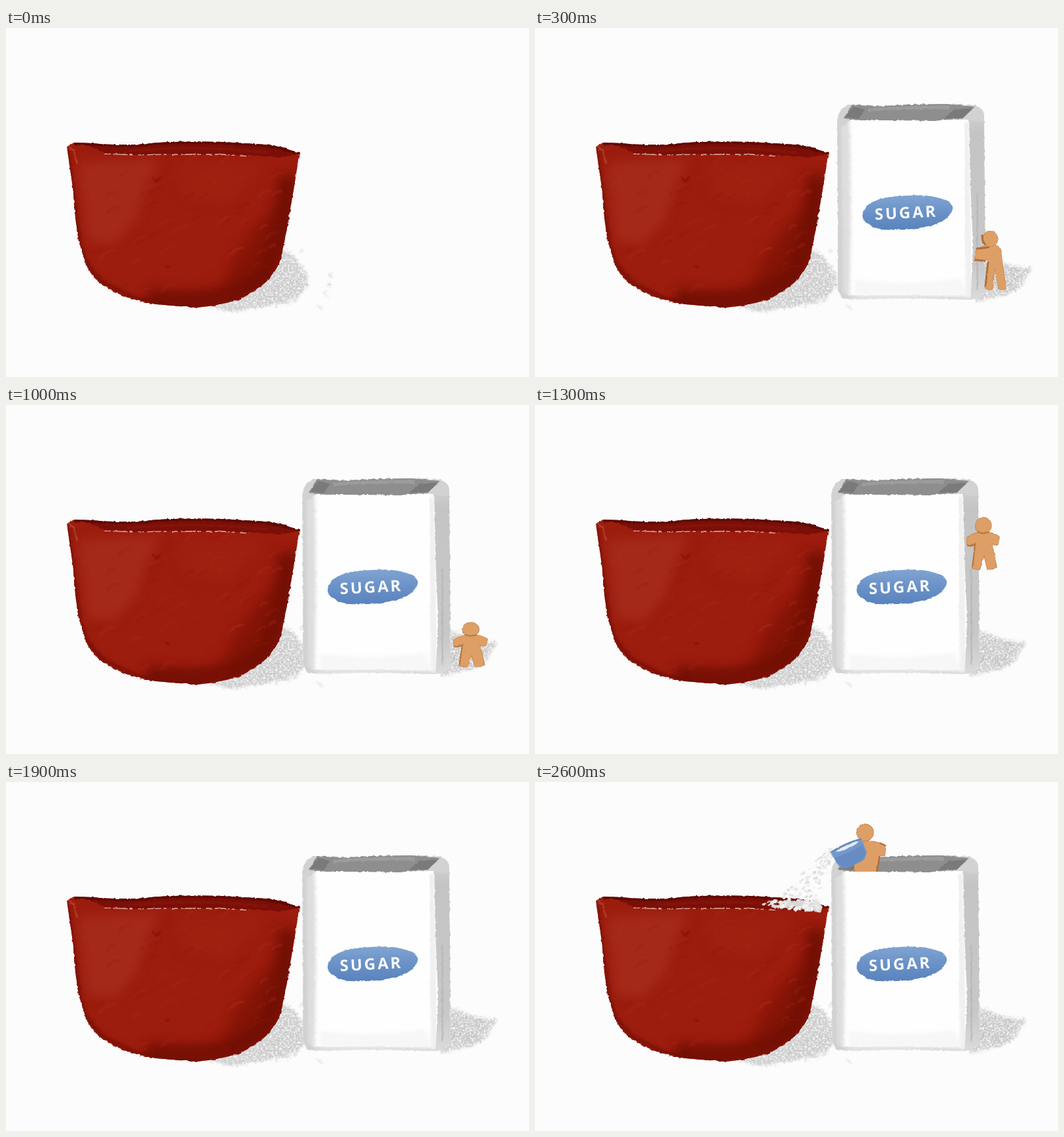
Recreate the animation shown at these times as an HTML page. Size 800 by 533 pixels, loop 2.7 s.

```html
<!DOCTYPE html>
<html lang="en">
<head>
<meta charset="utf-8">
<title>Baking day</title>
<style>
html, body { margin: 0; width: 100%; height: 100%; overflow: hidden; background: #fcfcfc; }
svg { display: block; width: 100vw; height: 100vh; }
</style>
</head>
<body>
<svg viewBox="0 0 800 533" preserveAspectRatio="none">
  <defs>
    <filter id="rough" filterUnits="userSpaceOnUse" x="80" y="90" width="700" height="350" color-interpolation-filters="sRGB">
      <feTurbulence type="fractalNoise" baseFrequency=".17" numOctaves="2" seed="4"/>
      <feDisplacementMap in="SourceGraphic" scale="3.5" xChannelSelector="R" yChannelSelector="G"/>
      <feGaussianBlur stdDeviation=".5"/>
    </filter>
    <filter id="crumb" x="-20%" y="-20%" width="140%" height="140%" color-interpolation-filters="sRGB">
      <feTurbulence type="fractalNoise" baseFrequency=".2" numOctaves="2" seed="8"/>
      <feDisplacementMap in="SourceGraphic" scale="2.5" xChannelSelector="R" yChannelSelector="G"/>
      <feGaussianBlur stdDeviation=".4"/>
    </filter>
    <filter id="chalk" filterUnits="userSpaceOnUse" x="290" y="320" width="500" height="130" color-interpolation-filters="sRGB">
      <feTurbulence type="fractalNoise" baseFrequency=".32" numOctaves="3" seed="11" result="n"/>
      <feColorMatrix in="n" values="0 0 0 0 0  0 0 0 0 0  0 0 0 0 0  0 0 0 2.6 -.5" result="grain"/>
      <feDisplacementMap in="SourceGraphic" in2="n" scale="14" xChannelSelector="R" yChannelSelector="G" result="edge"/>
      <feGaussianBlur in="edge" stdDeviation="1.2" result="dust"/>
      <feComposite in="dust" in2="grain" operator="in"/>
    </filter>
    <filter id="soft" x="-30%" y="-30%" width="160%" height="160%" color-interpolation-filters="sRGB"><feGaussianBlur stdDeviation="9"/></filter>
    <filter id="soft2" x="-30%" y="-30%" width="160%" height="160%" color-interpolation-filters="sRGB"><feGaussianBlur stdDeviation="2.5"/></filter>
    <linearGradient id="side" x1="0" x2="0" y1="0" y2="1">
      <stop offset="0" stop-color="#d6d6d6"/><stop offset=".15" stop-color="#c4c4c4"/>
      <stop offset=".8" stop-color="#c8c8c8"/><stop offset="1" stop-color="#dcdcdc"/>
    </linearGradient>
    <linearGradient id="oval" x1="0" x2="0" y1="0" y2="1">
      <stop offset="0" stop-color="#80a4d2"/><stop offset=".45" stop-color="#6c93c8"/><stop offset="1" stop-color="#5983bd"/>
    </linearGradient>
    <path id="bowlShape" d="M93 181L104 175 130 176Q170 180 215 177 255 172 330 174L395 178 423 182Q436 188 449 190L442 235 430 305 421 350Q416 367 405 380 389 399 356 415 325 424 292 427 262 425 230 422 203 418 179 409 151 397 136 383 123 367 119 350L111 325Q104 280 103 250Z"/>
    <clipPath id="bowlClip"><use href="#bowlShape"/></clipPath>
    <path id="boxShape" d="M453 136Q456 118 472 113L510 115 560 113 620 111 664 114Q677 118 678 130L679 250 680 398Q671 410 658 411L560 409 478 411 461 408 454 398 454 270Z"/>
    <clipPath id="boxClip"><use href="#boxShape"/></clipPath>
    <clipPath id="inside"><rect width="800" height="137"/></clipPath>
  </defs>

  <g filter="url(#chalk)" fill="#cfcfcf">
    <path d="M422 336L442 350 460 373 462 393 446 411 400 425 345 434 308 425 380 400Z"/>
    <path id="bowlHatch" stroke="#c9c9c9" stroke-width="2" fill="none"/>
    <path d="M496 374l3 8M494 388l2 10M488 402l3 9M478 424l5 5M450 340l4 3" stroke="#d4d4d4" stroke-width="3"/>
  </g>

  <g id="box">
    <g filter="url(#chalk)" fill="#cecece">
      <path d="M676 344L692 348 718 360 751 362 738 384 714 403 664 415Z"/>
      <path id="boxHatch" stroke="#c4c4c4" stroke-width="2" fill="none"/>
    </g>
    <g filter="url(#rough)">
      <use href="#boxShape" fill="#fefefe"/>
      <g clip-path="url(#boxClip)">
        <path d="M450 130H472Q476 260 472 415H450Z" fill="#dedede" filter="url(#soft2)"/>
        <path d="M456 140L458 400 470 412" stroke="#cbcbcb" stroke-width="5" fill="none" filter="url(#soft2)"/>
        <path d="M460 408Q560 402 660 410" stroke="#d2d2d2" stroke-width="7" fill="none" filter="url(#soft2)"/>
        <path d="M480 380Q560 390 640 378L655 405 480 405Z" fill="#f7f7f7" filter="url(#soft2)"/>
        <path d="M650 140L653 300 656 408" stroke="#f0f0f0" stroke-width="12" fill="none" filter="url(#soft2)"/>
        <path d="M655 128L680 112 684 415 657 415 661 330 657 230Z" fill="url(#side)"/>
        <path d="M667 250L668 395" stroke="#b4b4b4" stroke-width="5" fill="none" filter="url(#soft2)"/>
        <path d="M453 112H680V140L655 136H475L455 150Z" fill="#d2d2d2"/>
      </g>
      <path d="M463 134L476 113 510 116 560 113 620 112 664 116 645 134 600 138 540 137 490 137Z" fill="#8e8e8e"/>
      <path d="M465 132L477 116 496 120 486 135ZM617 134L632 121 662 118 645 134Z" fill="#7a7a7a"/>
      <path d="M500 121Q560 117 625 117" stroke="#9c9c9c" stroke-width="5" fill="none"/>
    </g>
    <g filter="url(#rough)">
      <path d="M492 283Q491 268 515 258 550 250 590 252 626 256 630 270 629 287 600 297 565 306 525 304 494 299 492 283Z" fill="url(#oval)"/>
    </g>
    <text x="511" y="289" transform="rotate(-3 511 289)" fill="#f8f9fb" font-family="'Noto Sans', sans-serif" font-size="24" font-weight="600" letter-spacing="3">SUGAR</text>
  </g>

  <g filter="url(#rough)">
    <use href="#bowlShape" fill="#9c1c0d"/>
    <g clip-path="url(#bowlClip)">
      <path d="M110 205L235 200 215 240 200 290 165 330 125 325Z" fill="#ad3626" opacity=".55" filter="url(#soft)"/>
      <path d="M260 205L400 205 340 270 270 260Z" fill="#a32313" opacity=".6" filter="url(#soft)"/>
      <path d="M432 225L424 300 398 372Q360 412 290 419L215 414" fill="none" stroke="#640c02" stroke-width="30" opacity=".75" filter="url(#soft)"/>
      <path d="M425 265L385 300 350 350 330 400 395 395 425 330Z" fill="#720f03" opacity=".55" filter="url(#soft)"/>
      <path d="M93 185L104 262 113 330 123 360 147 388 200 414 290 426" fill="none" stroke="#720f06" stroke-width="5" filter="url(#soft2)"/>
      <path d="M230 410Q300 395 350 405L330 424 250 424Z" fill="#7c1207" opacity=".6" filter="url(#soft2)"/>
      <path d="M222 226l8 5 8-6-3 9-8 2ZM241 362l12 2-8 4Z" fill="#861308" opacity=".7"/>
      <g id="strokes" fill="none" stroke-linecap="round"></g>
      <path d="M104 170H452V192L418 198 375 195 330 193 250 193 195 194 150 190Z" fill="#7b0f07"/>
      <path d="M105 176L130 177Q170 181 215 178 255 173 330 175L395 179 448 190" fill="none" stroke="#5e0a05" stroke-width="5"/>
      <path d="M185 188Q290 178 400 190" fill="none" stroke="#84130a" stroke-width="4"/>
      <path d="M95 180l9 8 5 20" fill="none" stroke="#b5503f" stroke-width="3" opacity=".6"/>
    </g>
    <path d="M150 192L195 194 250 193 330 193 372 196" fill="none" stroke="#e3b4a8" stroke-width="1.3" stroke-dasharray="9 5 22 3 5 8"/>
  </g>

  <g id="sugar" filter="url(#crumb)"></g>
  <g id="mask">
    <g id="man">
      <g filter="url(#crumb)" stroke="#c88a54" stroke-width="1" fill="#de9f66">
        <g id="stand">
          <path d="M-8-55Q-20-53-26-46L-25-35Q-18-33-13-38L-18-2Q-12 1-6 0L0-20 5 0Q12 1 19-3L12-38Q17-34 21-37L23-48Q18-53 8-55Z"/>
          <circle cx="-1" cy="-65" r="12"/>
          <path d="M-25-36Q-18-33-13-38L-17-4M-10-56Q-1-51 8-56" fill="none" stroke="#b5763f" stroke-width="2"/>
        </g>
        <g id="push">
          <path d="M-14-68L-29-63-32-44-17-46-11-46-16-2Q-9 1-4-1L-1-33 5-1Q11 1 17-2L11-40 8-64 0-69Z"/>
          <circle cx="-8" cy="-78" r="12"/>
          <path d="M-29-63L-9-65M-31-46L-15-44M-19-84Q-22-76-15-69M-11-43L-15-5" fill="none" stroke="#ad6f3c" stroke-width="3"/>
        </g>
        <g id="hold">
          <path d="M-8-47Q-26-45-28-36L-16-20-17 4 18 4 22-24 30-24 32-40Q20-46 8-47Z"/>
          <circle cx="0" cy="-60" r="13"/>
          <path d="M-10-46L-28-40M22-44L31-40M22-24L18 0" fill="none" stroke="#a96c3a" stroke-width="2"/>
        </g>
      </g>
    </g>
    <g id="cup" filter="url(#crumb)">
      <path d="M-28-17Q0-21 28-17L27 5Q25 14 17 17 0 20-17 17-25 14-26 4Z" fill="#7498cb"/>
      <path d="M-26-6Q0-2 26-7L25 5Q23 13 16 16 0 19-16 16-23 13-25 2Z" fill="#678cc3"/>
      <path d="M-28-17Q0-21 28-17" fill="none" stroke="#4d70a6" stroke-width="1.5"/>
      <path d="M-20-14Q-10-18 4-16 16-18 22-14 14-10 4-12-8-9-20-14Z" fill="#e8eef6"/>
    </g>
  </g>
</svg>
<script>
const $ = id => document.getElementById(id);
const LOOP = 2700, STEP = 100;

function random(seed) {
  return () => (seed = (seed * 16807) % 2147483647) / 2147483647;
}

function add(parent, name, attrs) {
  const el = document.createElementNS('http://www.w3.org/2000/svg', name);
  for (const key in attrs) el.setAttribute(key, attrs[key]);
  parent.appendChild(el);
}

// Slanted chalk lines scattered over an ellipse
function hatch(id, seed, cx, cy, rx, ry, count) {
  const rnd = random(seed);
  let d = '';
  for (let i = 0; i < count; i++) {
    const a = rnd() * 2 * Math.PI, r = Math.sqrt(rnd()), len = 8 + rnd() * 12;
    const x = cx + Math.cos(a) * r * rx, y = cy + Math.sin(a) * r * ry;
    d += `M${x.toFixed(1)} ${y.toFixed(1)}l${len.toFixed(1)} ${(-len * .6).toFixed(1)}`;
  }
  $(id).setAttribute('d', d);
}

function paintBowl() {
  const rnd = random(77);
  for (let i = 0; i < 90; i++) {
    const x = 110 + rnd() * 300, y = 205 + rnd() * 200, len = 4 + rnd() * 22;
    add($('strokes'), 'path', {
      d: `M${x} ${y}q${len / 2} ${-len * .6} ${len} ${-len * .5}`,
      stroke: rnd() < .5 ? '#b03626' : '#8a1609',
      'stroke-width': 1 + rnd() * 5,
      opacity: .08 + rnd() * .16
    });
  }
}

// Grains fall along a curve from the cup and pile up at the rim of the bowl
function paintSugar() {
  const rnd = random(31);
  const grain = (x, y, size) => add($('sugar'), 'ellipse', {
    cx: x, cy: y, rx: size * (.5 + rnd()), ry: size * (.4 + rnd() * .6),
    transform: `rotate(${-40 + rnd() * 30} ${x} ${y})`,
    fill: ['#f6f6f6', '#e8e8e8', '#dadada'][Math.floor(rnd() * 3)],
    opacity: .6 + rnd() * .4
  });
  for (let i = 0; i < 130; i++) {
    const u = rnd();
    grain(456 - 56 * u + (rnd() - .5) * (8 + 50 * u), 104 + 76 * u + (rnd() - .5) * 14, 2.6);
  }
  for (let i = 0; i < 190; i++) {
    const u = Math.sqrt(rnd());
    grain(349 + 87 * u, 186 + 3 * u + (rnd() - .5) * (8 + 9 * u), 3);
  }
}

const show = (id, on) => $(id).setAttribute('display', on ? 'inline' : 'none');
const place = (id, x, y, sx = 1, sy = sx, turn = 0) =>
  $(id).setAttribute('transform', `translate(${x} ${y}) rotate(${turn}) scale(${sx} ${sy})`);

function draw(k) {
  const shove = Math.min(1, Math.max(0, (4 - k) / 2));
  const pose = k < 5 ? 'push' : k < 19 ? 'stand' : 'hold';
  const holding = k >= 21;

  show('box', k > 0);
  place('box', 18 * shove, 8 * shove);
  for (const p of ['push', 'stand', 'hold']) show(p, p === pose);
  show('man', k > 0 && k !== 19 && k !== 20);
  show('cup', holding);
  show('sugar', k === 26);
  if (k >= 16) $('mask').setAttribute('clip-path', 'url(#inside)');
  else $('mask').removeAttribute('clip-path');

  if (k < 5) {
    place('man', 695 + 18 * shove, 396 + 8 * shove);
  } else if (k < 13) {
    const squat = Math.max(0, k - 7) * 3;
    place('man', 715 - squat / 3, 400, 1 + squat / 130, 1 - squat / 78);
  } else if (k < 19) {
    const u = (k - 12) / 5;
    place('man', 711 - 121 * u, 400 - 869 * u + 623 * u * u, 1 + .15 * u);
  } else {
    const sink = k < 22 ? 28 : 0;
    const tilt = Math.max(0, k - 24) / 2;
    place('man', 505, 137 + sink);
    place('cup', 498 - 16 * tilt, 115 + sink - 4 * tilt, 1 - .08 * tilt, 1 - .08 * tilt, -24 * tilt);
  }
}

hatch('bowlHatch', 5, 410, 400, 42, 30, 60);
hatch('boxHatch', 9, 700, 385, 30, 22, 40);
paintBowl();
paintSugar();

const start = performance.now();
let last = -1;
function tick() {
  const k = Math.floor(((performance.now() - start) % LOOP) / STEP);
  if (k !== last) draw(last = k);
  requestAnimationFrame(tick);
}
tick();
</script>
</body>
</html>
```
